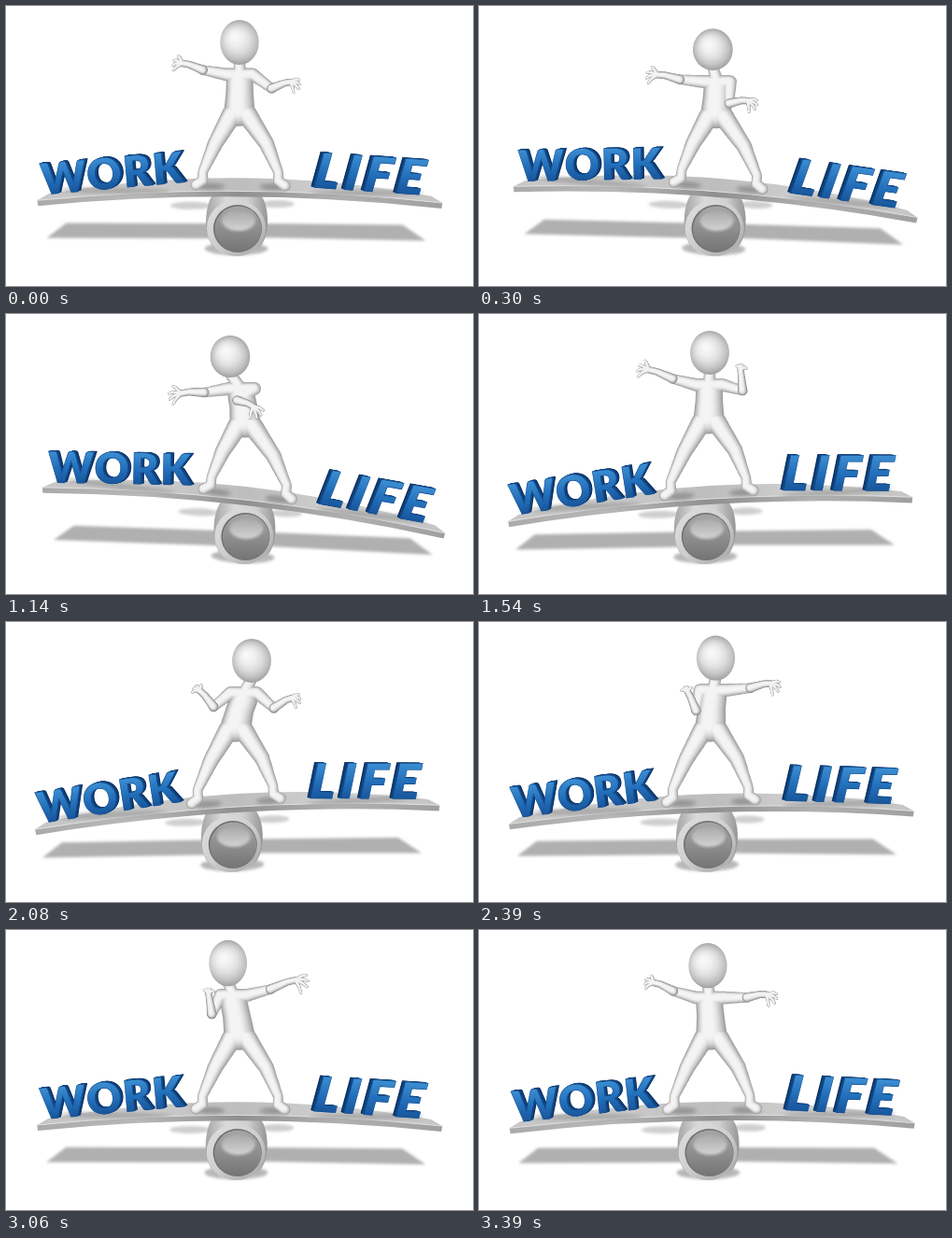
An HTML page with a canvas for the animation above (3500 ms loop, 500x300 px).

```html
<!DOCTYPE html>
<html lang="en">
<head>
<meta charset="utf-8">
<title>Work life balance</title>
<style>
html, body { margin: 0; width: 100%; height: 100%; overflow: hidden; background: #fff; }
canvas { display: block; width: 500px; height: 300px; }
</style>
</head>
<body>
<canvas id="stage" width="500" height="300"></canvas>
<script>
const ctx = document.getElementById('stage').getContext('2d');
const LOOP = 3500;
const PIVOT = { x: 246, y: 250 };

// The motion slows down at both extremes: [pictures, ms each]
const pace = [[3, 100], [4, 150], [2, 120], [4, 100], [4, 135], [4, 102.5], [9, 112.2]];
const steps = [0];
for (const [count, hold] of pace) {
  for (let i = 0; i < count; i++) steps.push(steps.at(-1) + hold);
}

// Board angle, top of the head and both hand tips; all other joints follow from these
const poses = [
  { t: 0, tilt: .5, head: [250, 15], left: [177, 62], right: [316, 82] },
  { t: 520, tilt: 6.7, head: [249, 29], left: [178, 83], right: [288, 115] },
  { t: 1140, tilt: 6.6, head: [240, 23], left: [174, 90], right: [274, 107] },
  { t: 1540, tilt: -3.3, head: [247, 18], left: [168, 59], right: [279, 52] },
  { t: 2080, tilt: -3.3, head: [263, 18], left: [200, 69], right: [316, 80] },
  { t: 2820, tilt: .5, head: [237, 10], left: [232, 64], right: [326, 47] },
  { t: 3390, tilt: -.6, head: [245, 14], left: [176, 56], right: [320, 72] }
];

// Smooth periodic interpolation between unevenly spaced poses
function poseAt(t) {
  const n = poses.length;
  const at = i => poses[(i + n) % n];
  const time = i => at(i).t + LOOP * Math.floor(i / n);
  const i = poses.findLastIndex(p => p.t <= t);
  const span = time(i + 1) - time(i), u = (t - time(i)) / span;
  const blend = value => {
    const slope = j => (value(at(j + 1)) - value(at(j - 1))) / (time(j + 1) - time(j - 1)) * span;
    const a = value(at(i)), b = value(at(i + 1));
    return a + (b - a) * u * u * (3 - 2 * u)
      + slope(i) * u * (1 - u) ** 2 - slope(i + 1) * u * u * (1 - u);
  };
  const pair = name => [0, 1].map(c => blend(p => p[name][c]));
  return { tilt: blend(p => p.tilt), head: pair('head'), left: pair('left'), right: pair('right') };
}

const mix = (a, b, u) => a.map((v, i) => v + (b[i] - v) * u);

function gradient(x0, y0, x1, y1, ...colors) {
  const g = ctx.createLinearGradient(x0, y0, x1, y1);
  colors.forEach((c, i) => g.addColorStop(i / (colors.length - 1), c));
  return g;
}

function fillPath(d, style) {
  ctx.fillStyle = style;
  ctx.fill(new Path2D(d));
}

function oval(x, y, rx, ry, style) {
  ctx.beginPath();
  ctx.ellipse(x, y, rx, ry, 0, 0, 7);
  ctx.fillStyle = style;
  ctx.fill();
}

function scoped(draw) {
  ctx.save();
  draw();
  ctx.restore();
}

function blurred(radius, draw) {
  scoped(() => {
    ctx.filter = `blur(${radius}px)`;
    draw();
  });
}

function turn(degrees) {
  ctx.translate(PIVOT.x, PIVOT.y);
  ctx.rotate(degrees * Math.PI / 180);
  ctx.translate(-PIVOT.x, -PIVOT.y);
}

function drawGroundShadow(tilt) {
  blurred(1.5, () => {
    ctx.translate(tilt * 1.2, 0);
    turn(tilt * .3);
    fillPath('M43 249 L64 233 L220 233 L222 249 Z', '#b0b0b0');
    fillPath('M274 233 L424 234 L449 251 L274 248 Z', '#b0b0b0');
    oval(246, 260, 34, 7, '#b8b8b8');
    oval(197, 214, 22, 4, '#cfcfcf');
    oval(290, 212, 18, 4, '#cfcfcf');
  });
}

function drawCylinder(tilt) {
  scoped(() => {
    ctx.translate((tilt - .5) * 1.37, 0);
    fillPath('M214 234 Q214 202 230 194 L264 194 Q281 204 280 234 Q278 268 247 268 Q216 268 214 234 Z',
      gradient(213, 0, 282, 0, '#a2a2a2', '#dadada', '#d0d0d0', '#909090'));
    oval(246.5, 238, 31.5, 30, gradient(220, 208, 272, 268, '#dedede', '#cfcfcf', '#a8a8a8'));
    oval(248, 238.5, 26, 25.5, '#6e6e6e');
    oval(248.5, 239, 25, 24.5, gradient(0, 214, 0, 264, '#a6a6a6', '#8e8e8e', '#747474'));
    blurred(1.5, () => oval(249, 230, 18, 11, gradient(0, 219, 0, 241, '#a8a8a8', '#d4d4d4')));
  });
}

function drawBoard() {
  fillPath('M33 210 Q250 187 467 209 L466 215 Q250 193 34 216 Z',
    gradient(33, 0, 467, 0, '#aaa', '#b9b9b9', '#8f8f8f', '#b2b2b2', '#9f9f9f'));
  fillPath('M33 210 L45 203 Q250 166 455 202 L467 209 Q250 187 33 210 Z',
    gradient(33, 0, 467, 0, '#c6c6c6', '#cdcdcd', '#bdbdbd', '#d2d2d2', '#c4c4c4'));
  ctx.strokeStyle = '#dedede';
  ctx.stroke(new Path2D('M33 210 Q250 187 467 209'));
  blurred(2, () => {
    for (const x of [219, 286]) oval(x, 193.5, 15, 3.5, '#929292');
    for (const x of [116, 386]) oval(x, 199, 60, 3, '#a5a5a5');
  });
}

function drawWord(text, x, y, angle, skew, size, spacing, depth) {
  scoped(() => {
    ctx.translate(x, y);
    ctx.rotate(angle * Math.PI / 180);
    ctx.transform(1, 0, skew, 1, 0, 0);
    ctx.font = `900 ${size}px Lato, "Open Sans", sans-serif`;
    ctx.letterSpacing = spacing + 'px';
    for (let i = 8; i > 0; i--) {
      ctx.fillStyle = i > 5 ? '#0b3262' : '#114581';
      ctx.fillText(text, depth * i / 8, -i / 8);
    }
    ctx.fillStyle = gradient(0, -size * .72, 0, 0, '#3b8dd2', '#2370bb', '#18569c');
    ctx.fillText(text, 0, 0);
    ctx.strokeStyle = '#174f90';
    ctx.lineWidth = .6;
    ctx.strokeText(text, 0, 0);
  });
}

// Rounded, lit tubes; each is a list of [x, y, radius]
function drawTubes(tubes, dark) {
  const passes = 9;
  for (let k = 0; k < passes; k++) {
    const u = k / (passes - 1);
    const v = Math.round(dark + (244 - dark) * (1 - (1 - u) ** 1.9));
    ctx.fillStyle = `rgb(${v},${v},${v})`;
    ctx.beginPath();
    for (const tube of tubes) {
      for (let i = 1; i < tube.length; i++) {
        const [a, b] = [tube[i - 1], tube[i]];
        const n = Math.max(1, Math.ceil(Math.hypot(b[0] - a[0], b[1] - a[1])));
        for (let j = 0; j <= n; j++) {
          const [x, y, r] = mix(a, b, j / n);
          const cx = x - r * .2 * u, cy = y - r * .14 * u, cr = r * (1 - .72 * u);
          ctx.moveTo(cx + cr, cy);
          ctx.arc(cx, cy, cr, 0, 7);
        }
      }
    }
    ctx.fill();
  }
}

// Elbow of a two-bone arm, bent outwards and down
function elbowOf(shoulder, hand, side) {
  const upper = 26, lower = 33;
  const dx = hand[0] - shoulder[0], dy = hand[1] - shoulder[1];
  const reach = Math.hypot(dx, dy);
  const d = Math.min(Math.max(reach, lower - upper + 1), upper + lower);
  const along = (upper ** 2 - lower ** 2 + d * d) / (2 * d);
  const bend = Math.sqrt(Math.max(0, upper ** 2 - along ** 2)) * .85;
  const [ux, uy] = [dx / reach, dy / reach];
  return [shoulder[0] + ux * along - side * uy * bend, shoulder[1] + uy * along + side * ux * bend];
}

function forearm(elbow, tip) {
  const wrist = mix(elbow, tip, .42);
  wrist[1] -= 3;
  const palm = mix(wrist, tip, .4);
  palm[1] -= 1;
  const angle = Math.atan2(tip[1] - palm[1], tip[0] - palm[0]);
  const length = Math.hypot(tip[0] - palm[0], tip[1] - palm[1]);
  const fingers = [-.5, 0, .5, 1.2].map(spread => {
    const along = u => [palm[0] + Math.cos(angle + spread) * length * u,
      palm[1] + Math.sin(angle + spread) * length * u];
    const [x, y] = along(.9);
    return [[...palm, 2.6], [...along(.6), 1.8], [x, y + 2, 1.3]];
  });
  return [[[...elbow, 5.2], [...wrist, 3.8], [...palm, 3.6]], ...fingers];
}

function drawFigure({ tilt, head: [headX, top], left, right }) {
  const headH = 24 - (top - 15) * .18;
  const headY = top + headH;
  const hip = [249.5 + tilt, 112 + Math.max(0, tilt) * .6];
  const chest = [(headX + hip[0]) / 2 + Math.max(0, tilt) * .6, headY + 35.5];
  const a = tilt * Math.PI / 180;
  const onBoard = (x, y) => [
    PIVOT.x + (x - PIVOT.x) * Math.cos(a) - (y - PIVOT.y) * Math.sin(a) + tilt * .25,
    PIVOT.y + (x - PIVOT.x) * Math.sin(a) + (y - PIVOT.y) * Math.cos(a)];
  const leg = side => {
    const ankleX = 250.5 + side * 40.5;
    const ankle = onBoard(ankleX, 178);
    const joint = [hip[0] + side * 8, hip[1] + 4];
    const knee = mix(joint, ankle, .5);
    knee[0] += side * 3 + 1;
    return [[[...joint, 11], [...knee, 8.3], [...ankle, 5.3]],
      [[...ankle, 5.3], [...onBoard(ankleX, 187), 5.8], [...onBoard(ankleX + side * 7, 192), 6]]];
  };
  const arms = [[-1, left], [1, right]].map(([side, hand]) => {
    const shoulder = [chest[0] + side * 14, chest[1] - 1];
    return { shoulder, hand, elbow: elbowOf(shoulder, hand, side) };
  });

  drawTubes([
    ...leg(-1), ...leg(1),
    [[headX, headY + headH - 4, 6], [...chest, 7]],
    [[chest[0], chest[1] + 7, 14.5], [...mix(chest, hip, .5), 14.8], [...hip, 16.5]],
    ...arms.map(arm => [[...chest, 8], [...arm.shoulder, 7], [...arm.elbow, 5.2]])
  ], 160);
  for (const arm of arms) drawTubes(forearm(arm.elbow, arm.hand), 135);

  const light = ctx.createRadialGradient(headX - 5, headY - 6, 2, headX, headY, headH + 1);
  ['#f8f8f8', '#efefef', '#dedede', '#c2c2c2', '#999'].forEach((c, i) => light.addColorStop(i / 4, c));
  oval(headX, headY, 31 - headH * .43, headH, light);
}

function draw(t) {
  const pose = poseAt(t);
  ctx.fillStyle = '#fff';
  ctx.fillRect(0, 0, 500, 300);
  drawGroundShadow(pose.tilt);
  drawCylinder(pose.tilt);
  scoped(() => {
    turn(pose.tilt);
    drawBoard();
    drawWord('WORK', 38, 204, -5.5, 0, 46, 1.5, 3.5);
    drawWord('LIFE', 326, 193.5, 3.5, -.2, 52, 5, -4);
  });
  drawFigure(pose);
}

let shown = -1;
function tick() {
  const t = performance.now() % LOOP;
  const step = steps.findLast(s => s <= t + .5) % LOOP;
  if (step !== shown) draw(shown = step);
  requestAnimationFrame(tick);
}
tick();
</script>
</body>
</html>
```
